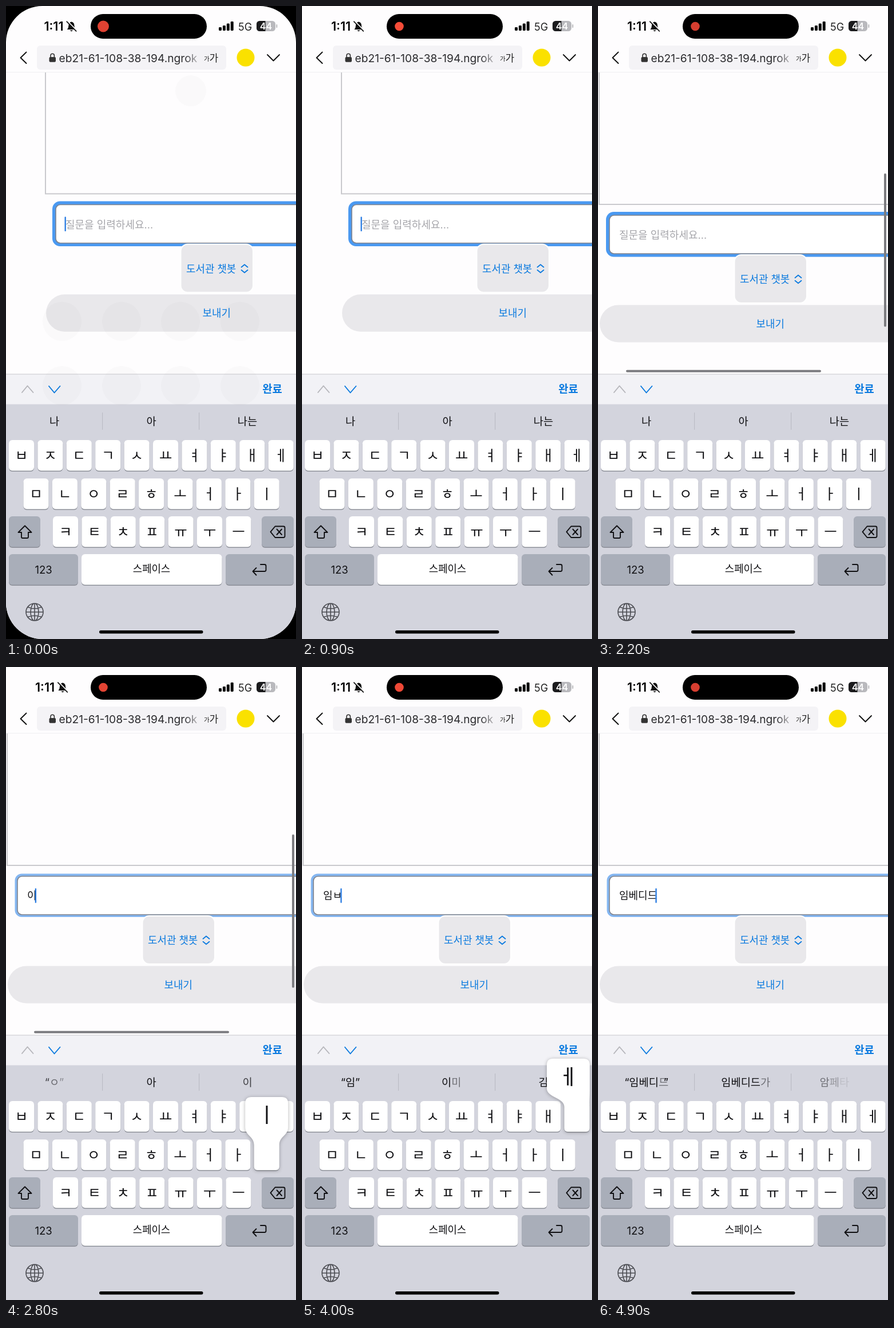
Recreate the animation shown at these times as an HTML page with a canvas. Size 507 px wide and 1104 px high, loop 5000 ms.

```html
<!DOCTYPE html>
<html lang="ko">
<head>
<meta charset="utf-8">
<title>도서관 챗봇</title>
<style>
html, body { margin: 0; width: 100%; height: 100%; overflow: hidden; background: #000; }
canvas { display: block; width: 507px; height: 1104px; }
</style>
</head>
<body>
<canvas id="stage"></canvas>
<script>
const W = 507, H = 1104, LOOP = 5000;
const FONT = 'Inter, "Noto Sans CJK KR", "Noto Sans CJK", sans-serif';
const BLUE = '#0a7adf', INK = '#101013', CHIP = '#e9e8eb';
const canvas = document.getElementById('stage');
const ctx = canvas.getContext('2d');
const dpr = window.devicePixelRatio || 1;
canvas.width = W * dpr;
canvas.height = H * dpr;

const clamp = v => Math.max(0, Math.min(1, v));
const lerp = (a, b, k) => a + (b - a) * k;
const ramp = (t, a, b) => clamp((t - a) / (b - a));
const easeOut = k => 1 - Math.pow(1 - k, 3);
const latest = (list, t) => list.reduce((best, e, i) => (t >= e[0] ? i : best), 0);

function box(x, y, w, h, r, fill) {
  ctx.beginPath();
  ctx.roundRect(x, y, w, h, r);
  ctx.fillStyle = fill;
  ctx.fill();
}

function dot(x, y, r, fill) {
  ctx.beginPath();
  ctx.arc(x, y, r, 0, Math.PI * 2);
  ctx.fillStyle = fill;
  ctx.fill();
}

function stroke(path, color, width) {
  ctx.strokeStyle = color;
  ctx.lineWidth = width;
  ctx.lineCap = ctx.lineJoin = 'round';
  ctx.stroke(new Path2D(path));
}

function setFont(size, weight = 400) {
  ctx.font = `${weight} ${size}px ${FONT}`;
}

// y is the optical middle of the line
function text(str, x, y, size, color = INK, align = 'center', weight = 400) {
  setFont(size, weight);
  ctx.textAlign = align;
  ctx.fillStyle = color;
  ctx.fillText(str, x, y + size * 0.37);
}

// ---- timelines ----
const typed = [[0, ''], [2400, 'ㅇ'], [2790, '이'], [3290, '임'], [3700, '임ㅂ'], [4050, '임베'],
  [4230, '임벧'], [4430, '임베디'], [4630, '임베딛'], [4790, '임베디드']];
const presses = [[2390, 'ㅇ'], [2780, 'ㅣ'], [3270, 'ㅁ'], [3680, 'ㅂ'], [3960, 'ㅔ'],
  [4190, 'ㄷ'], [4390, 'ㅣ'], [4590, 'ㄷ'], [4760, 'ㅡ']];
const hints = [
  [[0, '나'], [2680, '“ㅇ”'], [3050, '“이”'], [3500, '“임”'], [4200, '“임베”'], [4560, '“임베디”'], [4820, '“임베디드”']],
  [[0, '아'], [3050, '이'], [3920, '이미'], [4250, '임베'], [4500, '임베디드'], [4820, '임베디드가']],
  [[0, '나는'], [2680, '이'], [3500, '김'], [4250, ''], [4820, '암페타민']]
];

// ---- keyboard layout ----
const keys = [];
[['ㅂㅈㄷㄱㅅㅛㅕㅑㅐㅔ', 5, 757], ['ㅁㄴㅇㄹㅎㅗㅓㅏㅣ', 30.5, 824], ['ㅋㅌㅊㅍㅠㅜㅡ', 82, 890]]
  .forEach(([row, x0, y]) => [...row].forEach((ch, i) => keys.push({ ch, x: x0 + i * 50.4, y })));

function keycap(x, y, w, fill = '#fff') {
  box(x, y + 1.5, w, 53.5, 6, '#8c8f98');
  box(x, y, w, 53.5, 6, fill);
}

function popup({ ch, x, y }) {
  const w = 44, l = Math.max(5, Math.min(428, x - 15.5)), r = l + 75;
  const top = y - 74, a = y - 22, b = y + 10, m = y - 6, bot = y + 53.5;
  const p = new Path2D();
  p.moveTo(l + 11, top);
  p.lineTo(r - 11, top);
  p.quadraticCurveTo(r, top, r, top + 11);
  p.lineTo(r, a);
  p.bezierCurveTo(r, m, x + w, m, x + w, b);
  p.lineTo(x + w, bot - 6);
  p.quadraticCurveTo(x + w, bot, x + w - 6, bot);
  p.lineTo(x + 6, bot);
  p.quadraticCurveTo(x, bot, x, bot - 6);
  p.lineTo(x, b);
  p.bezierCurveTo(x, m, l, m, l, a);
  p.lineTo(l, top + 11);
  p.quadraticCurveTo(l, top, l + 11, top);
  ctx.save();
  ctx.shadowColor = 'rgba(0,0,0,.3)';
  ctx.shadowBlur = 6 * dpr;
  ctx.shadowOffsetY = dpr;
  ctx.fillStyle = '#fff';
  ctx.fill(p);
  ctx.restore();
  text(ch, (l + r) / 2, y - 42, 36);
}

function hint(list, cx, t) {
  const i = latest(list, t), now = list[i][1], old = i ? list[i - 1][1] : now;
  const k = i ? ramp(t, list[i][0], list[i][0] + 160) : 1;
  const quoted = now.startsWith('“');
  let same = 0;
  while (same < now.length && now[same] === old[same]) same++;
  setFont(18.7);
  ctx.textAlign = 'left';
  ctx.fillStyle = INK;
  const wNow = ctx.measureText(now).width, wOld = ctx.measureText(old).width;
  const width = same ? lerp(wOld, wNow, k) : wNow;
  let x = cx - width / 2;
  [...now].forEach((ch, n) => {
    const w = ctx.measureText(ch).width;
    const closing = quoted && n === now.length - 1;
    const solid = n < same || (closing && same);
    ctx.globalAlpha = solid || k === 1 ? 1 : clamp(k - (n - same) * 0.2);
    ctx.fillText(ch, closing ? cx + width / 2 - w : x, 724 + 7);
    x += w;
  });
  ctx.globalAlpha = 1;
}

// ---- parts of the screen ----
function statusBar(t, intro) {
  const dx = lerp(15.5, 0, intro);
  text('1:11', 51 + dx, 35.5, 21.5, '#000', 'left', 600);
  ctx.save();
  ctx.translate(90 + dx, 26);
  ctx.fillStyle = '#111';
  ctx.fill(new Path2D('M1.5 15 Q4 12 4 8 Q4 2.5 9 1.5 Q14 2.5 14 8 Q14 12 16.5 15 Z M6.5 16.3 H11.5 Q9 20 6.5 16.3 Z'));
  stroke('M1.8 .2 L18.3 16.8', '#fff', 2);
  stroke('M.8 1.2 L17.3 17.8', '#111', 1.7);
  ctx.restore();

  box(148, 14, 203, 43, 21.5, '#000');
  const glow = 0.5 + 0.5 * Math.cos((t - 850) / 2700 * Math.PI * 2);
  dot(170, 35.5, lerp(10, 7.8, intro),
    `rgb(${lerp(214, 246, glow)},${lerp(62, 76, glow)},${lerp(48, 56, glow)})`);

  [6, 9, 12.5, 16].forEach((h, i) => box(372 + i * 6.9, 43 - h, 5, h, 1.4, '#000'));
  text('5G', 406, 36, 18, '#222', 'left');
  box(438, 26, 33, 18, 5.5, '#b9b9bd');
  ctx.save();
  ctx.beginPath();
  ctx.rect(438, 26, 15.5, 18);
  ctx.clip();
  box(438, 26, 33, 18, 5.5, '#1b1b1d');
  ctx.restore();
  box(472.3, 32, 2, 6, 1, '#b9b9bd');
  text('44', 454.5, 35, 16, '#fff', 'center', 600);
}

function navBar() {
  stroke('M35.5 80.5 L25.5 90.2 L35.5 100', '#111', 1.9);
  box(54, 69, 331, 42, 6, '#f4f3f6');
  box(75.5, 89, 11.5, 8.8, 2, '#333');
  stroke('M78 89 V86.5 a3.2 3.2 0 0 1 6.4 0 V89', '#333', 1.6);
  const fade = ctx.createLinearGradient(312, 0, 340, 0);
  fade.addColorStop(0, '#2a2a2d');
  fade.addColorStop(1, 'rgba(42,42,45,.12)');
  ctx.save();
  ctx.beginPath();
  ctx.rect(90, 70, 249, 40);
  ctx.clip();
  text('eb21-61-108-38-194.ngrok', 92.5, 90.5, 19.2, fade, 'left');
  ctx.restore();
  text('가', 346, 92.5, 10.5, '#222', 'left');
  text('가', 355.5, 90.5, 17, '#222', 'left');
  dot(419, 90, 15.5, '#fae100');
  stroke('M457 85 L467.5 95.5 L478 85', '#111', 1.9);
  ctx.fillStyle = '#efeff1';
  ctx.fillRect(0, 115, W, 1);
}

function page(t) {
  const drag = easeOut(ramp(t, 930, 1220)), settle = easeOut(ramp(t, 1410, 1780));
  const ox = -40.5 * drag - 26.5 * settle, oy = 15.5 * drag + 3 * settle;
  const value = typed[latest(typed, t)][1];

  ctx.save();
  ctx.beginPath();
  ctx.rect(0, 116, W, 526);
  ctx.clip();
  ctx.save();
  ctx.translate(ox, oy);
  ctx.strokeStyle = '#c9c9cd';
  ctx.lineWidth = 2;
  ctx.strokeRect(69, 0, 598, 327.5);

  const g = value ? 4 : 5.5;
  box(86.5 - g, 346 - g, 600, 67.5 + g * 2, 8 + g, value ? '#84b6f1' : '#4a99f1');
  ctx.beginPath();
  ctx.roundRect(87, 346.5, 590, 67, 8);
  ctx.fillStyle = '#fff';
  ctx.fill();
  ctx.strokeStyle = '#80838c';
  ctx.lineWidth = 1.6;
  ctx.stroke();

  if (value) text(value, 104, 380, 18, INK, 'left');
  else text('질문을 입력하세요...', 104, 381, 18, '#a5a5aa', 'left');
  setFont(18);
  const cx = value ? 102.3 + ctx.measureText(value).width : 103.7;
  ctx.globalAlpha = value ? 1 : 1 - ramp(t, 1250, 1450);
  box(cx - 1.2, 367.5, 2.4, 25.5, 1, '#2f7fe3');
  ctx.globalAlpha = 1;

  box(304.5, 414.5, 128.5, 86, 13, '#fff');
  box(306.5, 416.5, 124.5, 82, 11, CHIP);
  text('도서관 챗봇', 315, 458, 17.9, BLUE, 'left');
  stroke('M411.5 455.5 L417 451 L422.5 455.5 M411.5 460.5 L417 465 L422.5 460.5', BLUE, 1.8);
  box(70, 503, 596, 65, 32.5, CHIP);
  text('보내기', 368.3, 535.5, 17.9, BLUE);
  ctx.restore();

  ctx.globalAlpha = ramp(t, 950, 1080) * (1 - ramp(t, 2950, 3200));
  box(500, 298.2 - oy / 3, 4, 267.5, 2, '#7c7c80');
  box(31 - (ox + 40.5) * 0.68, 634.8, 341, 4, 2, '#7c7c80');
  ctx.restore();
}

function keyboard(t) {
  box(0, 642, W, 52.5, 0, '#f2f2f6');
  box(0, 641.5, W, 1.2, 0, '#d2d2d6');
  stroke('M28 674 L37.5 662.5 L47.5 674', '#b6b6bb', 1.9);
  stroke('M75 663 L84.5 674.5 L94.5 663', BLUE, 1.9);
  text('완료', 465.5, 668, 18.8, BLUE, 'center', 700);

  box(0, 694.5, W, H - 694.5, 0, '#d3d4dd');
  [168, 337].forEach(x => box(x, 709, 1.2, 30, 0, '#bcbdc6'));
  hints.forEach((list, i) => hint(list, [84.5, 257 - 3 * (t < 3920 || t > 4250), 422][i], t));

  for (const { ch, x, y } of keys) {
    keycap(x, y, 44);
    text(ch, x + 22, y + 26.5, 24.5);
  }
  const gray = '#a9aeb9';
  keycap(5, 890, 55, gray);
  keycap(447, 890, 56, gray);
  keycap(5, 956, 121, gray);
  keycap(132, 956, 245.5, '#fff');
  keycap(384, 956, 119, gray);
  text('123', 65.5, 983, 18.5);
  text('스페이스', 254.5, 981.5, 17.8);
  stroke('M33 906.5 L44.5 918 H39 V926 Q39 928 37 928 H29 Q27 928 27 926 V918 H21.5 Z', INK, 1.9);
  stroke('M470.5 907.5 H485 Q487.5 907.5 487.5 910 V924.5 Q487.5 927 485 927 H470.5 L462.5 917.2 Z M473.5 912.5 L482 922 M482 912.5 L473.5 922', INK, 1.9);
  stroke('M437.5 980 L431.5 986 L437.5 992.5 M432 986 H452 Q454.5 986 454.5 983.5 V976.5 Q454.5 974 452 974 H445', INK, 1.9);
  stroke('M35 1057 a15 15 0 1 0 30 0 a15 15 0 1 0 -30 0 M43 1057 a7 15 0 1 0 14 0 a7 15 0 1 0 -14 0 M50 1042 V1072 M35 1057 H65 M38.5 1048.5 Q50 1053 61.5 1048.5 M38.5 1065.5 Q50 1061 61.5 1065.5', '#4b4c52', 1.6);
  box(163, 1089, 181.5, 5.5, 2.75, '#000');

  for (const [at, ch] of presses) {
    if (t >= at && t < at + 125) popup(keys.find(k => k.ch === ch));
  }
}

function ghosts(k) {
  if (k <= 0) return;
  const tint = `rgba(70,70,80,${0.02 * k})`;
  dot(323, 148, 27, tint);
  [550, 662].forEach(y => [98, 202, 305, 409].forEach(x => dot(x, y, 34, tint)));
}

function draw(t) {
  const intro = easeOut(ramp(t, 0, 500));
  ctx.setTransform(dpr, 0, 0, dpr, 0, 0);
  ctx.fillStyle = '#000';
  ctx.fillRect(0, 0, W, H);
  ctx.save();
  ctx.beginPath();
  ctx.roundRect(0, 0, W, H, 64 * (1 - intro));
  ctx.clip();
  ctx.fillStyle = '#fefdfe';
  ctx.fillRect(0, 0, W, H);
  page(t);
  navBar();
  statusBar(t, intro);
  keyboard(t);
  ghosts(1 - ramp(t, 0, 350));
  ctx.restore();
}

const start = performance.now();
function tick() {
  draw((performance.now() - start) % LOOP);
  requestAnimationFrame(tick);
}
tick();
</script>
</body>
</html>
```
